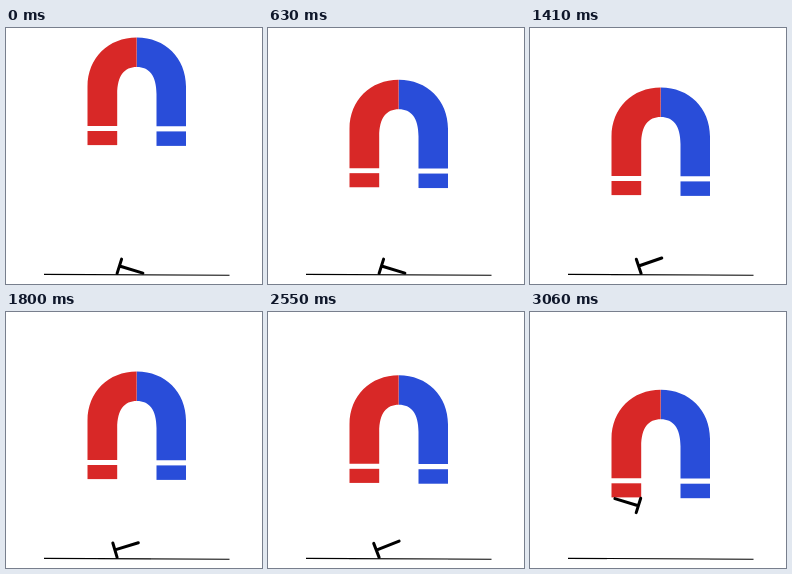
Recreate the animation shown at these times as an HTML page. Size 256x256 px, loop 3.63 s.

```html
<!DOCTYPE html>
<html lang="en">
<head>
<meta charset="utf-8">
<title>Magnet and nail</title>
<style>
  html, body { margin: 0; width: 100%; height: 100%; overflow: hidden; background: #fff; }
  svg { display: block; width: 100%; height: 100%; }
</style>
</head>
<body>
<svg viewBox="0 0 256 256">
  <path d="M38 246.4L223.5 247.2" stroke="#000" stroke-width="1.1"/>
  <g id="magnet">
    <g fill="#d82827">
      <path d="M81.5 98V58.5C81.5 30 102.5 9.5 130.7 9.5V39C118.5 39 111.2 47.5 111.2 66V98Z"/>
      <path d="M81.5 103H111.2V117.1H81.5Z"/>
    </g>
    <g fill="#294dd9">
      <path d="M180 98.3V58.5C180 30 159 9.5 130.9 9.5V39C143 39 150.5 47.5 150.5 66V98.3Z"/>
      <path d="M150.5 103.4H180V117.9H150.5Z"/>
    </g>
  </g>
  <!-- The nail turns about the lower tip of its head. -->
  <g id="nail" fill="none" stroke="#000" stroke-width="3" stroke-linecap="round">
    <path d="M0 0L4.5 -14.3M2.4 -7.4L25.8 -.3"/>
  </g>
</svg>
<script>
const LOOP = 3630, STEP = 30;
const magnet = document.getElementById('magnet');
const nail = document.getElementById('nail');

const smooth = p => p * p * (3 - 2 * p);

function bezier(x1, y1, x2, y2) {
  const at = (a, b, s) => 3 * a * s * (1 - s) ** 2 + 3 * b * s * s * (1 - s) + s ** 3;
  return x => {
    let lo = 0, hi = 1;
    for (let i = 0; i < 24; i++) {
      const mid = (lo + hi) / 2;
      if (at(x1, x2, mid) < x) lo = mid; else hi = mid;
    }
    return at(y1, y2, (lo + hi) / 2);
  };
}

// Keys are [time, value, easing towards this key].
function track(keys, t) {
  const next = keys.findIndex(key => key[0] > t);
  if (next < 0) return keys[keys.length - 1][1];
  if (next === 0) return keys[0][1];
  const [t0, v0] = keys[next - 1];
  const [t1, v1, ease = smooth] = keys[next];
  return v0 + (v1 - v0) * ease((t - t0) / (t1 - t0));
}

const drop = [[0, 0], [900, 50, bezier(.2, .15, .65, 1)], [2400, 50], [2910, 68.3]];
const turn = [
  [1200, 0], [1500, -46], [1800, -34], [2100, -46],
  [2400, -31], [2700, -46], [2820, -46], [3060, -180]
];
const pivotX = [[2820, 111.1], [3060, 110.7]];
const pivotY = [[2820, 245.4], [3060, 186.3]];

function draw(t) {
  magnet.setAttribute('transform', `translate(0 ${track(drop, t)})`);
  nail.setAttribute('transform',
    `translate(${track(pivotX, t)} ${track(pivotY, t)}) rotate(${track(turn, t)})`);
}

const start = performance.now();
function tick() {
  const t = (performance.now() - start) % LOOP;
  draw(Math.floor(t / STEP) * STEP);
  requestAnimationFrame(tick);
}
tick();
</script>
</body>
</html>
```
